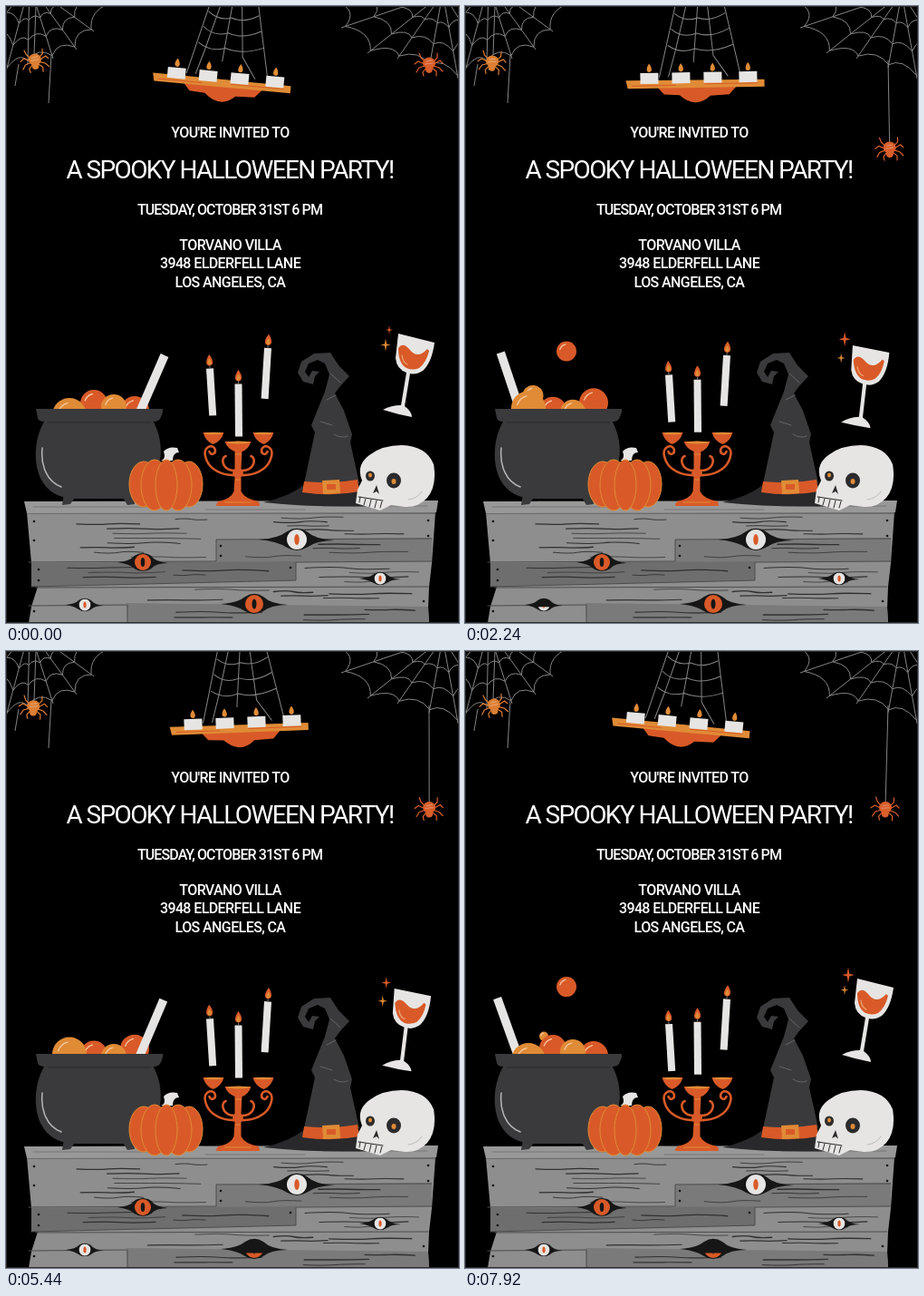
These frames come from a looping animation (500x680 px, 8000 ms). An HTML page:

```html
<!DOCTYPE html>
<html lang="en">
<head>
<meta charset="utf-8">
<title>A Spooky Halloween Party</title>
<style>
html, body { margin: 0; width: 100%; height: 100%; overflow: hidden; background: #000; }
svg { display: block; width: 500px; height: 680px; }
text { font: 500 16px Roboto, "Open Sans", sans-serif; letter-spacing: -.6px; fill: #fff; text-anchor: middle; }
.title { font-size: 28px; font-weight: 400; letter-spacing: -1.6px; }
.date { letter-spacing: -.9px; }
.o { fill: #d95a28; } .y { fill: #e08b36; } .w { fill: #e6e5e3; } .k { fill: #3a3a3c; } .b { fill: #161616; }
.web { fill: none; stroke: #858585; stroke-width: 1; }
.line { fill: none; stroke-linecap: round; stroke-linejoin: round; }
</style>
</head>
<body>
<svg viewBox="0 0 500 680">
<defs>
  <path id="flame" d="M0-7Q5 0 3 4Q0 7-3 4Q-5 0 0-7Z"/>
  <g id="spider" stroke="currentColor" fill="currentColor">
    <path class="line" stroke-width="1.2" d="M-4-2L-9-7-11-12M-5 0L-12-3-16 0M-5 2L-11 4-14 9M-3 4L-7 9-6 13M4-2L9-7 9-12M5 0L12-4 15-1M5 2L11 4 15 8M3 4L8 8 8 13"/>
    <ellipse cy="-1" rx="6.5" ry="6"/><circle cy="6" r="3.4"/>
    <path class="line" stroke="#fff" stroke-opacity=".3" d="M-3-3L3-4M-4 0L4-1"/>
  </g>
  <path id="spark" d="M0-1L.16-.16 .8 0 .16.16 0 1-.16.16-.8 0-.16-.16Z"/>
  <g id="arm">
    <path class="line" stroke="#d95a28" stroke-width="2.600" d="M-2 517C-16 518 -32 512 -36 498C-40 486 -29 482 -26 488C-24 494 -31 496 -32 491M-4 512C-18 512 -20 498 -14 496"/>
    <path class="o" d="M-39 470H-16Q-19 480-28 483Q-36 480-39 470Z"/>
    <ellipse class="y" cx="-27.500" cy="471" rx="10" ry="1.300"/>
  </g>
</defs>

<g id="webs" class="web"></g>
<path class="web" d="M33 0L31 54M50 54L47 107M14 64L10 88"/>
<use id="leftSpider" href="#spider" color="#dd7f34"/>
<path id="thread" class="web"/>
<use id="rightSpider" href="#spider" color="#d95f2b"/>

<g id="lamp">
  <path class="web" d="M232-5L212 78M284-5L302 78M244-5L230 50L222 78M256-5L250 62M266-5L272 55L288 78M230 8Q242 18 256 13Q270 18 286 8M226 25Q238 36 254 30Q270 36 290 25M222 43Q236 53 252 47Q270 53 294 43"/>
  <path class="o" d="M209 88H298L289 98L268 99Q252 114 234 98L217 97Z"/>
  <path class="y" d="M175 81L328 82 328 90 177 90Z"/>
  <path class="line" stroke="#d95a28" d="M182 87H230M262 86H320"/>
  <g id="lampCandles"></g>
</g>

<text x="247.500" y="144.500">YOU'RE INVITED TO</text>
<text x="247" y="189.500" class="title">A SPOOKY HALLOWEEN PARTY!</text>
<text x="247" y="230" class="date">TUESDAY, OCTOBER 31ST 6 PM</text>
<text x="247.500" y="269">TORVANO VILLA</text>
<text x="247.500" y="289">3948 ELDERFELL LANE</text>
<text x="247.500" y="310">LOS ANGELES, CA</text>

<!-- table -->
<g id="table">
  <path fill="#8e8e8e" d="M23 558H474L470 614 467 640 466 664 467 680H25L28 662 35 640 28 614Z"/>
  <path fill="#7a7a7a" d="M232 588L470 586 470 612 232 613Z"/>
  <path fill="#6e6e6e" d="M28 614L320 612 320 633 28 640Z"/>
  <path fill="#7a7a7a" d="M133 658L466 662 467 680H134Z"/>
  <path class="line" stroke="#4c4c4c" d="M24 559H474M25 613L232 612V588L470 587M28 640L320 633V613L470 612M33 641L466 640M25 661L134 660V680"/>
  <g id="grain" class="line" stroke="#303030"></g>
  <path fill="#989898" d="M20 546L477 545 475 558 23 559Z"/>
  <path class="line" stroke="#777" d="M30 552H180M220 555H330M350 551H465"/>
  <g id="nails"></g>
</g>
<g id="eyes"></g>

<!-- cauldron -->
<g id="pops"></g>
<g id="balls"></g>
<path id="stick" stroke="#e6e5e3" stroke-width="9.500"/>
<g id="front"></g>
<path class="k" d="M64 538L62 550 71 549 77 540ZM128 540L134 550 142 549 141 538Z"/>
<path class="k" d="M44 455C30 476 30 506 39 522Q50 543 78 543H132Q158 538 167 512C174 492 171 472 161 455Z"/>
<path class="k" d="M33 444H173Q174 447 170 455Q168 458 163 458H42Q36 458 35 454Z"/>
<path class="line" stroke="#29292a" d="M46 459H160"/>
<path class="line" stroke="#b5b5b5" stroke-width="1.500" d="M40 487C38 506 45 524 61 530"/>

<!-- pumpkin -->
<g class="o">
  <path class="w" d="M171 501Q177 499 174 491Q179 485 189 487L191 492Q184 492 184 501Z"/>
  <g stroke="#e08b36">
    <ellipse cx="152" cy="527" rx="16" ry="25"/><ellipse cx="202" cy="527" rx="15" ry="25"/>
    <ellipse cx="164" cy="528" rx="15" ry="28"/><ellipse cx="190" cy="528" rx="15" ry="28"/>
    <ellipse cx="177" cy="528" rx="12" ry="28"/>
  </g>
</g>

<!-- candelabra -->
<g transform="translate(256.500 0)">
  <use href="#arm"/><use href="#arm" transform="scale(-1 1)"/>
  <path class="o" d="M-15 480H14Q11 489 4 491L3 510Q8 514 3 519L3 535Q7 543 22 546Q25 551 22 551H-23Q-27 551-22 546Q-8 543-5 535L-4 519Q-9 514-4 510L-4 491Q-12 488-15 480Z"/>
  <ellipse class="y" cy="481" rx="13" ry="1.500"/>
  <path class="line" stroke="#e08b36" d="M-3 494H3M-3 522H2M-15 547H14"/>
</g>
<g id="candles"></g>

<!-- hat -->
<path fill="#29292b" d="M284 547Q312 541 330 527H389Q398 540 407 551Q340 553 284 547Z"/>
<path class="k" d="M329 526L341 470 337 462 352 425 357 406 352 394 344 390 334 394 330 403 334 409 338 402 346 403 341 408 339 417 328 414 322 404 326 392 340 383 358 382 367 396 379 408 368 420 363 427 373 446 382 472 380 481 390 526Q360 531 329 526Z"/>
<path class="line" stroke="#666" d="M358 405L369 415M354 434L364 429M347 458L360 462M362 472Q370 477 377 474"/>
<path class="o" d="M329 524Q360 527 388 522L390 535Q360 541 327 536Z"/>
<path class="y" d="M349 523L368 522 369 537 350 538Z"/><path class="o" d="M354 527H364V533H354Z"/>

<!-- skull -->
<path class="w" d="M386 548L388 533 393 523Q386 506 401 495Q415 484 437 484Q464 485 472 505Q476 529 465 542Q455 553 440 552L425 550 413 556Z"/>
<g fill="#2b2b2d">
  <ellipse cx="402" cy="518" rx="5" ry="5.500"/><ellipse cx="428" cy="523" rx="8" ry="8.500"/>
  <path d="M409 528L405 537 409 535 412 538Z"/>
  <path class="line" stroke="#2b2b2d" d="M391 541L390 547M397 543L395 550M403 544L401 552M409 545L407 553M415 546L413 553M389 541L416 545"/>
</g>
<ellipse class="y" cx="402" cy="517" rx="2" ry="2.500"/><ellipse class="y" cx="428" cy="524" rx="2.500" ry="3"/>
<path class="line" stroke="#bbb" d="M444 544Q454 543 459 535"/>

<!-- glass -->
<g id="glass">
  <path class="w" d="M433 361L473 371Q470 393 460 402Q452 407 446 405L440 441Q448 447 448 453Q432 450 416 445Q425 440 436 440L442 404Q431 400 430 388Z"/>
  <path class="o" d="M433 377Q438 370 445 378Q454 390 465 378L467 380Q464 393 456 399Q449 402 442 399Q433 394 433 377Z"/>
  <path class="line" stroke="#e9a16f" stroke-width="1.300" d="M437 385Q438 393 443 395"/>
</g>
<use id="spark1" href="#spark" class="o"/>
<use id="spark2" href="#spark" class="y"/>
<path fill="none" stroke="#2b2b2b" d="M.5.5H499.500V679.500H.5Z"/>
</svg>
<script>
const LOOP = 8000, STEP = 80;
const $ = id => document.getElementById(id);
const add = (id, markup) => { $(id).insertAdjacentHTML("beforeend", markup); return $(id).lastElementChild; };
const move = (el, x, y, rest = "") => el.setAttribute("transform", `translate(${x} ${y}) ${rest}`);
const wave = (t, period) => Math.cos(2 * Math.PI * t / period);
const clamp = v => Math.max(0, Math.min(1, v));
let seed = 7;
const rnd = () => (seed = seed * 16807 % 2147483647) / 2147483647;

// Strands from a hub to the tips, joined by sagging rings
function web(hx, hy, tips, rings) {
  const at = ([x, y], f) => [hx + (x - hx) * f, hy + (y - hy) * f];
  let d = tips.map(p => `M${hx} ${hy}L${p}`).join("");
  for (const f of rings) {
    for (let i = 1; i < tips.length; i++) {
      const a = at(tips[i - 1], f), b = at(tips[i], f);
      const mid = at([(tips[i - 1][0] + tips[i][0]) / 2, (tips[i - 1][1] + tips[i][1]) / 2], f * .84);
      d += `M${a}Q${mid} ${b}`;
    }
  }
  add("webs", `<path d="${d}"/>`);
}
web(26, -24, [[-30, 45], [0, 72], [24, 64], [52, 58], [78, 48], [97, 28], [118, -2]], [.45, .7, .96]);
web(482, -14, [[362, -4], [370, 24], [399, 52], [432, 58], [467, 68], [499, 80], [530, 60]], [.4, .68, .96]);

for (const x of [201, 236, 271, 310]) {
  add("lampCandles", `<path class="w" d="M${x - 10} 73H${x + 10}V85H${x - 10}Z"/>`);
  add("lampCandles", `<use href="#flame" class="y" transform="translate(${x} 68) scale(.75)"/>`);
}

// Wood grain: x, y, width, height, strokes
for (const [x, y, w, h, n] of [[35, 563, 200, 47, 9], [240, 562, 220, 22, 5], [240, 591, 220, 18, 4],
  [40, 618, 270, 13, 5], [325, 617, 135, 20, 4], [50, 642, 400, 14, 6], [145, 664, 310, 14, 5]]) {
  for (let i = 0; i < n; i++) {
    const len = 35 + rnd() * 65, gx = x + rnd() * (w - len), gy = y + (i + .5) / n * h;
    add("grain", `<path stroke-width="${.7 + rnd() * .7}" d="M${gx} ${gy}q${len / 3} ${rnd() * 4 - 2} ${len / 2} 0t${len / 2} ${rnd() * 2 - 1}"/>`);
  }
}
for (const [x, y] of [[31, 568], [31, 589], [36, 621], [36, 633], [466, 567], [466, 584], [237, 595], [237, 606], [314, 619], [461, 656], [31, 667]])
  add("nails", `<circle class="b" cx="${x}" cy="${y}" r="1.300"/>`);

// Eyes: place, half width of the knot, ball radius, colours, blink times
const eyes = [
  [321, 588, 42, 11, "#e6e5e3", "#d95a28", [1050, 4690, 6750]],
  [151, 613, 28, 9, "#d95a28", "#161616", [650, 5700]],
  [413, 631, 23, 6.500, "#e6e5e3", "#d95a28", [2900, 5900]],
  [87, 660, 21, 6.500, "#e6e5e3", "#d95a28", [2360, 4600]],
  [274, 659, 37, 10, "#d95a28", "#161616", [450, 1250, 5550, 8030]],
].map(([x, y, w, r, ball, pupil, blinks], i) => {
  const h = r * 1.15;
  add("eyes", `<g transform="translate(${x} ${y})">
    <path class="b" d="M${-w} 0Q${-w / 2} -1 ${-r} ${-h * .7}Q0 ${-h * 1.25} ${r} ${-h * .7}Q${w / 2} 0 ${w} 1Q${w / 2} 1 ${r} ${h * .7}Q0 ${h * 1.2} ${-r} ${h * .7}Q${-w / 2} 2 ${-w} 0Z"/>
    <clipPath id="lid${i}"><rect x="${-r}" width="${2 * r}" height="40"/></clipPath>
    <g clip-path="url(#lid${i})"><circle r="${r}" fill="${ball}"/>
    <ellipse rx="${r * .25}" ry="${r * .55}" fill="${pupil}"/></g></g>`);
  return { r, blinks, lid: $("lid" + i).firstElementChild };
});

// Brew: x, radius, colour, y at both ends of the bob
const ball = (id, r, c) => add(id, `<g><circle r="${r}" class="${c}"/><path class="line" stroke="#f3c9a4" stroke-width="1.300" d="M${-r * .65} ${-r * .2}Q${-r * .5} ${-r * .6} ${-r * .1} ${-r * .7}"/></g>`);
const brew = [[97, 15, "o", 438, 446], [142, 16, "o", 446, 437], [119, 14, "y", 442, 448], [70, 19, "y", 451, 443]]
  .map(([x, r, c, a, b]) => ({ x, a, b, el: ball("balls", r, c) }));

// Bubbles: x, radius, colour, start, cycle, speed, life
const pops = [[112, 11, "o", 1250, 5480, .052, 1700], [87, 5, "y", 2950, 4790, .041, 2150], [75, 11.500, "y", 2150, 9000, .029, 1410]]
  .map(([x, r, c, start, cycle, speed, life]) => ({ x, start, cycle, speed, life, el: ball("pops", r, c) }));

// Floating candles: x, y of the top, tilt, length, rise, period
const candles = [[225, 405.500, -3, 52, -6, 3100], [256.500, 412.500, 0, 58, 4, 3100], [289, 382, 4, 56, -5, 3440]]
  .map(([x, y, tilt, len, rise, period]) => ({
    x, y, tilt, rise, period,
    el: add("candles", `<g><path class="w" d="M-4 0H4L4.500 ${len}H-3.500Z"/><path stroke="#777" d="M0 0V-3"/><use href="#flame" class="o" y="-8.500"/><use href="#flame" class="y" transform="translate(0 -7) scale(.6)"/></g>`)
  }));

function draw(t) {
  const bob = wave(t, 4000), low = (1 - bob) / 2;

  $("lamp").setAttribute("transform", `rotate(${5.2 * wave(t, 8000)} 252 -64)`);
  move($("leftSpider"), 31 + bob, 61 - bob, `rotate(${-5 * bob})`);

  const drop = (1 - Math.cos(Math.PI * clamp(t / 3000))) / 2;
  const sx = t < 3050 ? 467 + 2 * drop : 464.3 + 4.7 * wave(t - 3050, 2800);
  const sy = 64 + 109.5 * drop;
  move($("rightSpider"), sx, sy, `rotate(${(467 - sx) * .8})`);
  $("thread").setAttribute("d", `M467 60L${sx} ${sy}`);

  for (const c of candles) move(c.el, c.x, c.y + c.rise * wave(t, c.period), `rotate(${c.tilt})`);

  move($("glass"), -3 * low, 13 * low, `rotate(${-3 * low} 442 405)`);
  const s1 = 7.2 - 2.4 * wave(t, 1700), s2 = 6 + wave(t, 1700);
  move($("spark1"), 423 - 4 * low, 357 + 10.500 * low, `scale(${s1})`);
  move($("spark2"), 419 - 4 * low, 373.500 + 15 * low, `scale(${s2})`);

  const stir = wave(t, 5600);
  $("stick").setAttribute("d", `M${100 + 75 * stir} ${376 + 9 * stir * stir}L${100 + 48 * stir} 447`);
  for (const b of brew) move(b.el, b.x, b.a + (b.b - b.a) * low);
  // The near ball hides the ladle on its way left
  $(t % 5600 < 2800 ? "front" : "balls").append(brew[3].el);

  for (const p of pops) {
    const age = (t - p.start) % p.cycle;
    move(p.el, p.x, 432 - age * p.speed);
    p.el.setAttribute("opacity", age < 0 ? 0 : clamp((p.life - age) / 400));
  }

  for (const e of eyes) {
    const shut = Math.max(...e.blinks.map(b => clamp(1.3 - Math.abs(t - b) / 190)));
    e.lid.setAttribute("y", e.r * (2 * shut - 1));
  }
}

function frame(now) {
  draw(Math.floor(now % LOOP / STEP) * STEP);
  requestAnimationFrame(frame);
}
draw(0);
requestAnimationFrame(frame);
</script>
</body>
</html>
```
